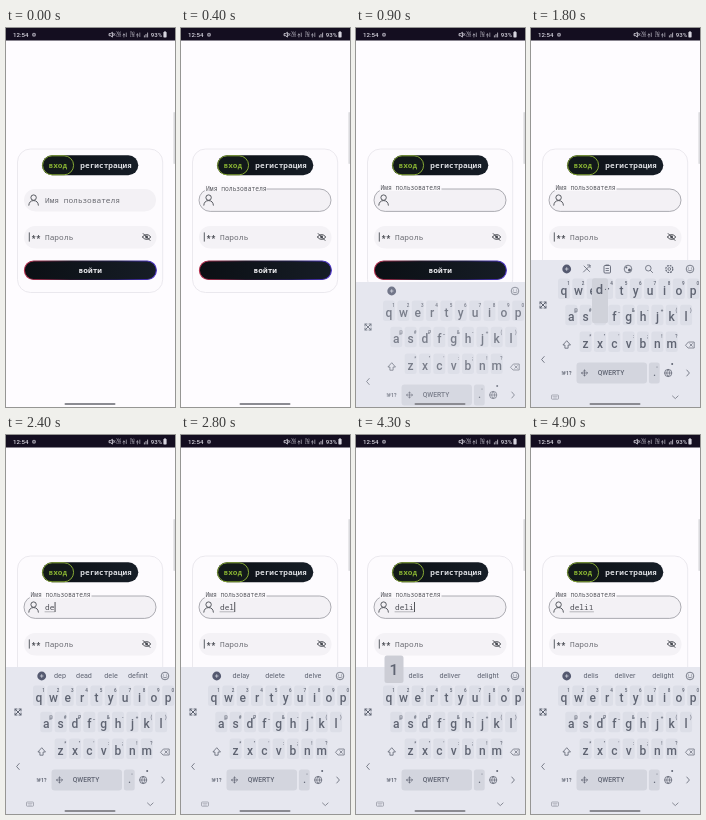
An HTML page for the animation above (5 s loop, 169x379 px).

```html
<!DOCTYPE html>
<html lang="ru">
<head>
<meta charset="utf-8">
<title>Вход</title>
<style>
html, body { margin: 0; width: 100%; height: 100%; overflow: hidden; background: #fefcff }
svg { display: block; width: 100vw; height: 100vh }
text { white-space: pre; font-family: Roboto, sans-serif }
.mono { font-family: "Noto Sans Mono", "DejaVu Sans Mono", monospace }
.line { fill: none; stroke-linecap: round; stroke-linejoin: round }
</style>
</head>
<body>
<svg id="stage" viewBox="0 0 169 379">
  <defs>
    <linearGradient id="dark"><stop stop-color="#0b0f14"/><stop offset="1" stop-color="#161d26"/></linearGradient>
    <linearGradient id="rim"><stop stop-color="#b8304f"/><stop offset=".35" stop-color="#28182c"/><stop offset=".7" stop-color="#221d50"/><stop offset="1" stop-color="#5036cf"/></linearGradient>
  </defs>
  <g id="page"></g>
  <g id="field"></g>
  <g id="keyboard"></g>
  <g id="system"></g>
</svg>
<script>
const LOOP = 5000, STEP = 100;
const $ = id => document.getElementById(id);
const clamp = x => Math.max(0, Math.min(1, x));
const mix = (a, b, p) => a + (b - a) * p;

const INK = '#5f6472';
const rect = (x, y, w, h, r, fill, more = '') =>
  `<rect x="${x}" y="${y}" width="${w}" height="${h}" rx="${r}" fill="${fill}" ${more}/>`;
const line = (d, color = INK, width = 0.8) =>
  `<path class="line" d="${d}" stroke="${color}" stroke-width="${width}"/>`;
const dot = (x, y, r, fill, more = '') => `<circle cx="${x}" cy="${y}" r="${r}" fill="${fill}" ${more}/>`;
const ring = (x, y, r, color = INK, width = 0.8) =>
  dot(x, y, r, 'none', `stroke="${color}" stroke-width="${width}"`);
const text = (s, x, y, size, fill, more = '') =>
  `<text x="${x}" y="${y}" font-size="${size}" fill="${fill}" ${more}>${s}</text>`;
const MID = 'text-anchor="middle"', MONO = 'class="mono"', BOLD = 'font-weight="700"', MEDIUM = 'font-weight="500"';

// Latest entry of [time, value] pairs at time t
const at = (track, t) => track.reduce((v, [start, next]) => t >= start ? next : v, track[0][1]);

const typed = [[0, ''], [1900, 'd'], [2300, 'de'], [2800, 'del'], [3100, 'deli'], [4900, 'deli1']];
const caret = [[0, 0], [1200, .5], [1300, 1], [1800, 0], [1900, 1], [3600, 0], [4300, 1], [4600, 0]];
const pressed = [[0, ''], [1800, 'd'], [1900, ''], [2100, 'e'], [2300, ''], [2700, 'l'], [2800, ''],
  [3000, 'i'], [3100, ''], [3800, 'q'], [4300, '1'], [4800, '']];
const hints = [
  [0, null],
  [2100, [['do', 54], ['did', 78], ['day', 105], ['down', 132]]],
  [2400, [['dep', 54], ['dead', 78], ['dele', 105], ['definit', 132]]],
  [2800, [['delay', 60], ['delete', 94], ['delve', 132]]],
  [3200, [['delis', 60], ['deliver', 94], ['deli', 126], ['c', 147.5]]],
  [3600, [['delis', 60], ['deliver', 94], ['delight', 132]]]
];
const rows = [
  { keys: 'qwertyuiop', marks: '1234567890', x: 33, y: 267 },
  { keys: 'asdfghjkl', marks: '@#₽_&-+()', x: 40.3, y: 293.3 },
  { keys: 'zxcvbnm', marks: '*"\':;!?', x: 54.6, y: 320 }
];
const PITCH = 14.35;

function drawPage() {
  return rect(0, 0, 169, 379, 0, '#fefcff') +
    rect(167.4, 84, 1.6, 52, .8, '#dadade') +
    rect(11.5, 121, 145.2, 143.5, 13, '#fdfbfe', 'stroke="#e6e4ea" stroke-width=".8"') +
    rect(36, 127.3, 96.3, 20, 10, 'url(#dark)') +
    rect(36.6, 127.8, 31, 19, 9.5, '#12191a', 'stroke="#86a935" stroke-width="1"') +
    text('вход', 42.5, 140.2, 7.8, '#86b032', `${MONO} ${BOLD}`) +
    text('регистрация', 74.3, 140.2, 7.8, '#dcdee2', `${MONO} font-weight="600"`) +
    rect(18, 198, 132.5, 22.6, 11.3, '#f4f2f6') +
    line('M23.3 204.8v8.4', '#4a4d54', .9) +
    text('**', 25.3, 213.8, 8, '#4a4d54', `${MONO} ${BOLD}`) +
    text('Пароль', 39, 212, 7.8, '#66676e', `${MONO} ${MEDIUM}`) +
    line('M136.4 209q4.2 -5 8.4 0q-4.2 5 -8.4 0M137.2 205.6l6.8 6.8', '#45484f', 1) +
    dot(140.6, 209, 1.4, '#45484f') +
    rect(18.4, 233, 132, 18.5, 9.2, 'url(#dark)', 'stroke="url(#rim)" stroke-width="1.1"') +
    text('войти', 84.3, 245, 7.8, '#f2f2f5', `${MONO} ${BOLD} ${MID}`);
}

function drawField(t) {
  const p = clamp(t / 500), e = 1 - (1 - p) ** 2;
  const word = at(typed, t), end = 39 + word.length * 4.7;
  const label = text('Имя пользователя', mix(39, 24.5, e), mix(174.5, 162, e), mix(7.8, 6.25, e),
    e > .5 ? '#55565d' : '#66676e', `${MONO} ${MEDIUM}`);
  return rect(18, 161, 132, 22.4, 11.2, '#f3f1f5',
      `stroke="#a3a3aa" stroke-width=".9" stroke-opacity="${e}"`) +
    (e > .6 ? rect(23.5, 157, 62, 6, 1, '#faf8fb') : '') + label +
    ring(27.6, 169.6, 2.7, '#484b52', .9) +
    line('M22.8 177.2q.4 -4.6 4.8 -4.6t4.8 4.6', '#484b52', .9) +
    text(word, 39, 174.5, 7.8, '#4b4c53', `${MONO} ${MEDIUM}`) +
    (word ? line(`M39 176.8H${end}`, '#77787f', .5) : '') +
    rect(end + .2, 167, .9, 10, 0, '#3f4147', `opacity="${at(caret, t)}"`);
}

function drawTools() {
  return line('M52.5 244l6.5-6.5M53 238l5.5 5.5M56.5 237h2.5v2.5') +
    rect(73, 237.5, 6.5, 7.5, 1, 'none', `stroke="${INK}" stroke-width=".9"`) +
    line('M75 237h2.5M75 240.5h2.5M75 242.5h2.5') +
    ring(97, 241, 3.8) + dot(95.4, 239.5, 1, INK) + dot(98.5, 242, 1.5, INK) +
    ring(117.3, 240.2, 2.8) + line('M119.4 242.4l2.2 2.2') +
    ring(138.3, 241, 1.4) +
    dot(138.3, 241, 3.5, 'none', `stroke="${INK}" stroke-width="1.2" stroke-dasharray="1.8 .95"`);
}

function drawKey(c, x, y, mark) {
  return rect(x - 6, y - 16.5, 12, 20.5, 2.5, '#dcdee7') +
    text(c, x, y, 12, INK, `${MID} ${MEDIUM}`) +
    text(mark, x + 4.6, y - 9.6, 4.6, INK, `${MID} ${MEDIUM}`);
}

function drawPopup(key) {
  if (key === '1')
    return rect(28.5, 220.5, 19, 27.5, 2.5, '#cccdd5') + text('1', 37.8, 240, 15.5, INK, `${MID} ${MEDIUM}`);
  for (const { keys, x, y } of rows) {
    const i = keys.indexOf(key);
    if (key && i >= 0) {
      const cx = x + i * PITCH;
      return rect(cx - 8, y - 43, 16, 45, 2.5, '#d0d2da') +
        text(key, cx - .5, y - 27, 13, INK, `${MID} ${MEDIUM}`) + dot(cx + 5.5, y - 32, .6, INK);
    }
  }
  return '';
}

function drawKeyboard(t) {
  if (t < 700) return '';
  const p = clamp((t - 600) / 400), drop = 147 * (1 - p) ** 1.37;
  const words = at(hints, t);
  let s = dot(35.7, 241, 4.4, '#555a70') + line('M34.3 241h2.8M35.7 239.6v2.8', '#dfe1ea', .7) +
    ring(159, 241, 3.8) + dot(157.6, 240, .5, INK) + dot(160.4, 240, .5, INK) +
    line('M157 242q2 2 4 0', INK, .7);
  if (words) s += words.map(([w, x]) =>
    text(w, x, 243.4, 7.2, w.length > 1 ? INK : '#b4b7c1', MID)).join('');
  else if (t >= 1000) s += drawTools();

  for (const { keys, marks, x, y } of rows)
    [...keys].forEach((c, i) => { s += drawKey(c, x + i * PITCH, y, marks[i]); });

  s += line('M9 274l6 6M9 280l6-6M9 276v-2h2M13 274h2v2M15 278v2h-2M11 280h-2v-2', INK, 1) +
    line('M13.2 328.5l-2.6 3 2.6 3M155.8 342l2.6 3-2.6 3') +
    line('M35.5 313l-3.6 4h2v3.2h3.2V317h2z') +
    line('M154.8 317l2.6-3h5.8v6h-5.8zM158.8 315.7l2.6 2.6m0-2.6l-2.6 2.6', INK, .7) +
    text('!#1?', 35.5, 347, 5.2, INK, `${MID} ${BOLD}`) +
    rect(45.5, 334.5, 70.5, 21, 3, '#d3d5de') +
    line('M50.5 345h6M53.5 342v6M51.5 344l-1 1 1 1M55.5 344l1 1-1 1M52.5 343l1-1 1 1M52.5 347l1 1 1-1', INK, .7) +
    text('QWERTY', 80, 347.4, 6.7, INK, `${MID} ${MEDIUM}`) +
    rect(117.9, 334.5, 10.8, 21, 2.5, '#d3d5de') +
    text('.', 123.5, 347.5, 9, INK, `${MID} ${BOLD}`) + dot(126, 339, .5, INK) +
    ring(137.2, 345, 3.6, INK, .8) + dot(141.2, 336, 1, INK) +
    line('M133.8 345h6.8M137.2 341.5q-3 3.5 0 7q3 -3.5 0 -7', INK, .7) +
    rect(20.5, 367, 7, 4.2, .7, 'none', 'stroke="#8e919c" stroke-width=".7"') +
    line('M22 368.6h4M22.7 370h2.6', '#8e919c', .5) +
    line('M141.5 368l2.8 2.6 2.8-2.6', '#7d818c', .9);

  return `<g transform="translate(0 ${drop})">` +
    rect(0, 232, 169, 147, 0, '#e6e7ef') +
    `<g opacity="${mix(.2, 1, p)}">${s}</g>${drawPopup(at(pressed, t))}</g>`;
}

function drawSystem() {
  const pale = '#d6d4de';
  return rect(0, 0, 169, 12.5, 0, '#140e20') +
    text('12:54', 7, 8.9, 6.1, pale, MEDIUM) + dot(28, 6.7, 2, '#9a97a4') + dot(28, 6.7, .8, '#3a3545') +
    line('M103.5 5.6h1.2l1.7-1.3v4.8l-1.7-1.4h-1.2z', pale, .9) + line('M107.4 5.4l1.6 2.2m0-2.2l-1.6 2.2', pale, .6) +
    [110.5, 124].map(x => text('Vo)', x, 6.3, 3, pale) + text('LTE', x, 9.3, 3, pale) +
      line(`M${x + 7.4} 9v-3m-1 1l1-1 1 1M${x + 9.8} 5v3.6`, pale, .6)).join('') +
    line('M138.4 9v-1.2M140 9v-2.6M141.6 9v-4', pale, .8) +
    text('93%', 144.8, 8.9, 6.1, pale, MEDIUM) +
    rect(157.4, 4, 3.2, 5.4, .6, pale) + rect(158.3, 3.2, 1.4, 1, 0, pale) +
    rect(58.5, 375, 51, 1.9, .95, '#8b8b92');
}

$('page').innerHTML = drawPage();
$('system').innerHTML = drawSystem();

let shown = -1;
function tick() {
  const t = Math.floor(performance.now() % LOOP / STEP) * STEP;
  if (t !== shown) {
    shown = t;
    $('field').innerHTML = drawField(t);
    $('keyboard').innerHTML = drawKeyboard(t);
  }
  requestAnimationFrame(tick);
}
tick();
</script>
</body>
</html>
```
